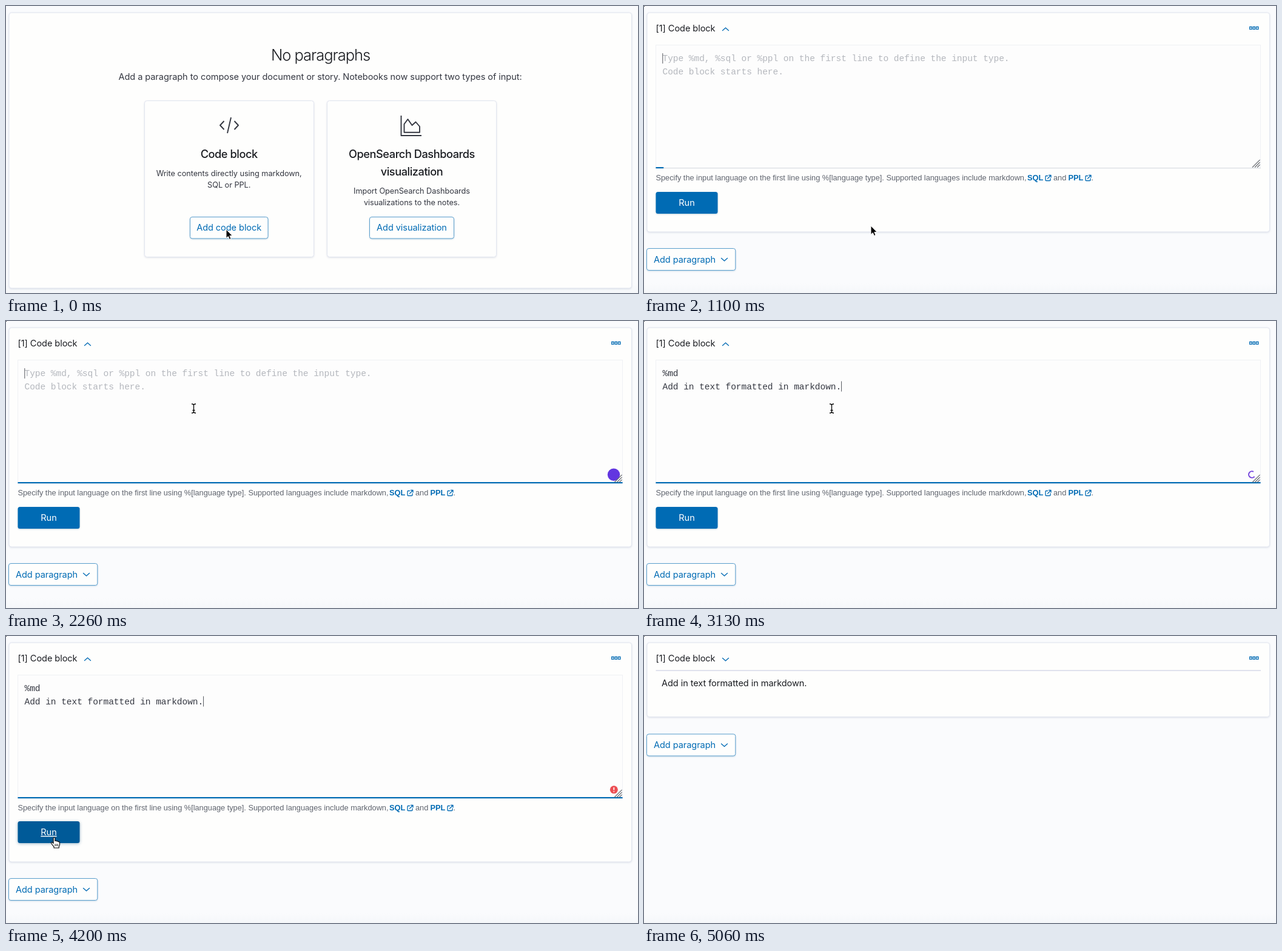
Write an HTML page that moves like this. It is 1042 px wide and 474 px high and loops after 5.4 s.

```html
<!DOCTYPE html>
<html lang="en">
<head>
<meta charset="utf-8">
<title>Notebook code block</title>
<style>
html, body { margin: 0; width: 100%; height: 100%; overflow: hidden; background: #fafbfd; }
svg { display: block; width: 1042px; height: 474px; }
text { font: 400 14.57px Inter, sans-serif; font-optical-sizing: none; letter-spacing: -.005em; fill: #343741; white-space: pre; }
.mid { text-anchor: middle; }
.big { font-size: 25.5px; font-weight: 300; letter-spacing: -.04em; fill: #1a1c21; }
.head { font-size: 18.2px; font-weight: 500; letter-spacing: -.025em; fill: #1a1c21; }
.small { font-size: 12.75px; }
.dark { fill: #1a1c21; }
.link { fill: #006bb4; }
.help { font: 12.75px "Liberation Sans", Arial, sans-serif; letter-spacing: 0; fill: #5f646e; }
.help.link { font-weight: 700; fill: #006bb4; }
.code { font-family: "Liberation Mono", "Courier New", monospace; }
.hint { fill: #b4b7bd; }
.panel { fill: #fefefd; stroke: #e1e5ef; filter: drop-shadow(0 1.5px 1.5px rgba(120,130,165,.22)); }
.btn { fill: #fefefd; stroke: #5b9fcd; filter: drop-shadow(0 1px 1px rgba(0,80,140,.22)); }
.line { fill: none; stroke: #006bb4; stroke-width: 1.3; stroke-linecap: round; stroke-linejoin: round; }
.icon { fill: none; stroke: #343741; stroke-width: 1.9; stroke-linejoin: round; }
</style>
</head>
<body>
<svg viewBox="0 0 1042 474" xmlns="http://www.w3.org/2000/svg">
  <defs>
    <linearGradient id="fade" x2="0" y2="1">
      <stop offset="0" stop-color="#fafbfd"/><stop offset="1" stop-color="#f5f7fa"/>
    </linearGradient>
    <g id="ext" class="line" stroke-width="1.1">
      <path d="M4 1.5H1.5Q.5 1.5 .5 2.5V8.5Q.5 9.5 1.5 9.5H7.5Q8.5 9.5 8.5 8.5V6M6 .5H9.5V4M9.3 .7L4 6"/>
    </g>
  </defs>
  <rect width="1042" height="474" fill="#fafbfd"/>
  <rect y="458" width="1042" height="16" fill="url(#fade)"/>
  <rect id="speck" width="1" height="1" fill="#111"/>

  <g id="empty">
    <rect class="panel" x="5" y="11" width="1026.5" height="455" rx="4"/>
    <text class="mid big" x="518.5" y="89.5">No paragraphs</text>
    <text class="mid" x="518" y="121.5">Add a paragraph to compose your document or story. Notebooks now support two types of input:</text>
    <rect class="panel" x="228.5" y="156.5" width="279" height="258" rx="4"/>
    <rect class="panel" x="529.5" y="156.5" width="279" height="258" rx="4"/>
    <path class="icon" d="M359.5 190L353 197L359.5 204M376.5 190L383 197L376.5 204M371 184L365 210"/>
    <path class="icon" d="M651.5 181V214H685M656.5 208.800V195L662.500 187L669.500 197L675.500 191.500L682 199V208.800Z"/>
    <text class="mid head" x="367.700" y="250.500">Code block</text>
    <text class="mid small" x="367.700" y="280.500">Write contents directly using markdown,</text>
    <text class="mid small" x="367.700" y="299.500">SQL or PPL.</text>
    <text class="mid head" x="669" y="250.500">OpenSearch Dashboards</text>
    <text class="mid head" x="669" y="280">visualization</text>
    <text class="mid small" x="669" y="309.500">Import OpenSearch Dashboards</text>
    <text class="mid small" x="669" y="328.500">visualizations to the notes.</text>
    <g id="addCode">
      <rect class="btn" x="303.500" y="348.500" width="128.500" height="35.500" rx="3.500"/>
      <rect id="tint" x="303.500" y="348.500" width="128.500" height="35.500" rx="3.500" fill="#006bb4"/>
      <text id="addText" class="mid link" x="367.700" y="371">Add code block</text>
    </g>
    <rect class="btn" x="599.500" y="348.500" width="139" height="35.500" rx="3.500"/>
    <text class="mid link" x="669" y="371">Add visualization</text>
  </g>

  <g id="block">
    <rect id="panel" class="panel" x="5" y="11" width="1026.500" rx="4"/>
    <text class="dark" x="19.500" y="42">[1] Code block</text>
    <path id="fold" class="line"/>
    <path class="line" style="stroke-linejoin:miter" d="M998.700 34.500h3.300v3.800h-3.300zM1004.100 34.500h3.300v3.800h-3.300zM1009.500 34.500h3.300v3.800h-3.300z"/>

    <g id="editor">
      <rect x="19.500" y="64.500" width="997" height="203" fill="#fdfdfd" stroke="#eff1f4"/>
      <path d="M19 267.800H1017" stroke="#d3d7df"/>
      <rect id="focus" x="19.500" y="266" height="2.200" fill="#006bb4"/>
      <g id="hint">
        <text class="code hint" x="30.500" y="91">Type %md, %sql or %ppl on the first line to define the input type.</text>
        <text class="code hint" x="30.500" y="112.500">Code block starts here.</text>
      </g>
      <text id="line1" class="code" x="30.500" y="91"></text>
      <text id="line2" class="code" x="30.500" y="112.500"></text>
      <rect id="caret" width="1" height="17" fill="#55585f"/>
      <circle id="badge" cx="1002" cy="253.700" r="10.200" fill="#6236e0"/>
      <path id="spin" d="M4.200 3.300A5.300 5.300 0 1 1 2.600 -4.600" fill="none" stroke="#7545dd" stroke-width="2"/>
      <g id="alert">
        <circle cx="1002.300" cy="253.800" r="6.500" fill="#ec4f54"/>
        <path d="M1002.300 250V254.600M1002.300 256.200V257.800" stroke="#fff" stroke-width="1.700"/>
      </g>
      <path d="M1003 266.500L1015.500 254M1007 266.500L1015.500 258M1011 266.500L1015.500 262" stroke="#696c72" stroke-width="1.100"/>
      <text class="help" x="19.500" y="287.500">Specify the input language on the first line using %[language type]. Supported languages include markdown,</text>
      <text class="help link" x="632" y="287.500">SQL</text>
      <use href="#ext" x="661.500" y="279"/>
      <text class="help" x="675" y="287.500">and</text>
      <text class="help link" x="699.500" y="287.500">PPL</text>
      <use href="#ext" x="727.500" y="279"/>
      <text class="help" x="737.500" y="287.500">.</text>
      <g id="run">
        <rect id="runBox" x="19.500" y="307" width="102" height="36" rx="3.500"/>
        <text id="runText" class="mid" x="70.500" y="330" style="fill:#fff">Run</text>
      </g>
    </g>

    <g id="output">
      <path d="M19.500 57H1017" stroke="#d6d9e8" stroke-width="1.300"/>
      <text class="dark" x="29" y="82.500">Add in text formatted in markdown.</text>
    </g>

    <g id="more">
      <rect class="btn" x="4.500" y="400.500" width="146.300" height="36" rx="3.500"/>
      <text class="link" x="16" y="423.500">Add paragraph</text>
      <path class="line" d="M127.500 416.500L132.500 421L137.500 416.500"/>
    </g>
  </g>

  <g id="arrow">
    <path d="M0 0V14.500L3.300 11.500L5.500 16.500L8 15.400L5.800 10.500H10.200Z" fill="#000" stroke="#fff" stroke-width="1" stroke-linejoin="round"/>
  </g>
  <g id="hand">
    <path d="M-1.400 9V1.500Q-1.400 0 0 0T1.400 1.500V6Q3 4.800 4 6.500Q5.500 5.500 6.400 7.200Q9 6.800 9 9V12Q9 13.500 7.800 15V17.500H-.500V15.500Q-2.500 13.500 -4.600 10.300Q-5.500 8.500 -4 8.200Q-2.800 8 -1.400 10Z" fill="#fff" stroke="#000" stroke-width="1.100" stroke-linejoin="round"/>
    <path d="M1.500 11V14.500M3.700 11V14.500M5.900 11V14.500" stroke="#000" stroke-width=".900"/>
  </g>
  <g id="beam">
    <path d="M-3.500 -7.500Q0 -7.500 0 -5.500Q0 -7.500 3.500 -7.500M0 -6V6M-3.500 7.500Q0 7.500 0 5.500Q0 7.500 3.500 7.500M-2 3H2" fill="none" stroke="#000" stroke-width="1.300"/>
  </g>
</svg>
<script>
const LOOP = 5400, STEP = 200 / 3;
const OPEN = 1030, TYPE = 2795, DONE = 4395;
const LINE1 = '%md', LINE2 = 'Add in text formatted in markdown.';
const CHAR = 8.67;

const el = {};
document.querySelectorAll('[id]').forEach(e => el[e.id] = e);
const set = (e, attrs) => { for (const k in attrs) e.setAttribute(k, attrs[k]); };
const show = (e, on) => e.style.display = on ? '' : 'none';
const clamp = v => Math.max(0, Math.min(1, v));
const prog = (t, a, b) => clamp((t - a) / (b - a));
const smooth = p => p * p * (3 - 2 * p);
const within = (t, a, b) => t >= a && t < b;
const underline = (e, on) => e.style.textDecoration = on ? 'underline' : 'none';

// start, end, from, to, easing
const moves = [
  [420, 760, [363, 369], [374, 363], smooth],
  [1535, 2060, [374, 363], [309.5, 144.5], smooth],
  [3335, 4000, [309.5, 144.5], [79.5, 332.5], smooth],
  [4533, 4866, [78, 332], [392, -40], p => p]
];

function pointer(t) {
  let pos = moves[0][2];
  for (const [a, b, from, to, ease] of moves) {
    if (t < a) break;
    const p = ease(prog(t, a, b));
    pos = from.map((v, i) => v + (to[i] - v) * p);
  }
  return pos;
}

function snap(t) {
  return t < 1180
    ? Math.max(0, Math.floor((t + 40) / STEP) * STEP - STEP / 2)
    : Math.floor((t + 8) / STEP) * STEP;
}

function drawEditor(t, overRun) {
  set(el.focus, { width: 997 * prog(t, 1083, 1233) ** 2 });
  const n = t < TYPE ? 0 : Math.min(37, Math.ceil((t - 2735) / 398 * 37));
  show(el.hint, n === 0);
  el.line1.textContent = LINE1.slice(0, n);
  el.line2.textContent = LINE2.slice(0, Math.max(0, n - 3));
  const low = n > 3;
  set(el.caret, { x: 30.3 + CHAR * (low ? n - 3 : n), y: low ? 99.5 : 78 });
  show(el.caret, !within(t, 1730, 2260) && !within(t, 3660, 4130));

  show(el.badge, within(t, 1795, TYPE));
  show(el.spin, within(t, TYPE, 3595));
  set(el.spin, { transform: `translate(1002.3 253.5) rotate(${(t - 3133) * 0.4})` });
  show(el.alert, t >= 3595);

  set(el.run, { transform: `translate(0 ${overRun ? -1 : 0})` });
  set(el.runBox, { fill: overRun ? '#005a98' : '#006bb4' });
  el.runBox.style.filter = `drop-shadow(0 1.5px ${overRun ? 2.5 : 1}px rgba(0,70,120,${overRun ? .4 : .25}))`;
  underline(el.runText, overRun);
}

function render(time) {
  const t = snap(time);
  const [x, y] = pointer(t);
  const open = t >= OPEN, done = t >= DONE, editing = open && !done;

  show(el.speck, t >= 30);
  show(el.empty, !open);
  show(el.block, open);
  show(el.editor, !done);
  show(el.output, done);

  const hover = smooth(prog(t, 400, 660));
  set(el.addCode, { transform: `translate(0 ${-hover})` });
  set(el.tint, { opacity: 0.1 * hover });
  el.addCode.style.filter = hover ? `drop-shadow(0 2px 2px rgba(0,80,140,${0.2 * hover}))` : 'none';
  underline(el.addText, hover > 0);

  set(el.panel, { height: done ? 122.5 : 362 });
  set(el.fold, { d: done ? 'M129.500 36.500L134.500 41L139.500 36.500' : 'M129.500 40.500L134.500 36L139.500 40.500' });
  set(el.more, { transform: `translate(0 ${done ? -238.5 : 0})` });

  const overRun = editing && x > 20 && x < 121 && y > 306 && y < 343;
  if (editing) drawEditor(t, overRun);

  const hand = overRun || (!open && hover > 0);
  const beam = editing && y > 64 && y < 268;
  const kind = hand ? 'hand' : beam ? 'beam' : 'arrow';
  for (const k of ['hand', 'beam', 'arrow']) {
    show(el[k], k === kind);
    set(el[k], { transform: `translate(${x} ${y})` });
  }
}

const start = performance.now();
function tick() {
  render((performance.now() - start) % LOOP);
  requestAnimationFrame(tick);
}
tick();
</script>
</body>
</html>
```
